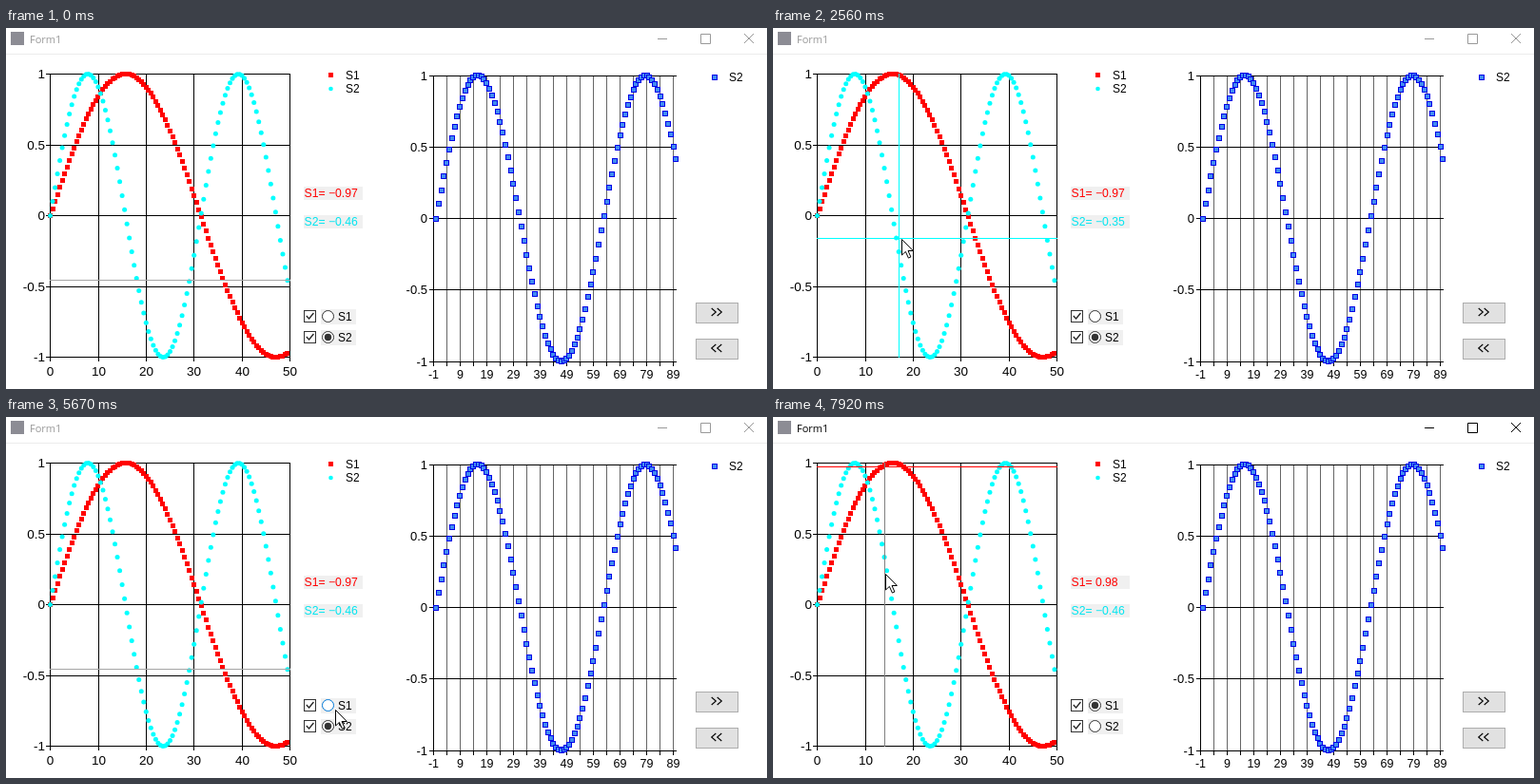
Recreate the animation shown at these times as an HTML page. Size 800x380 px, loop 8 s.

```html
<!DOCTYPE html>
<html lang="en">
<head>
<meta charset="utf-8">
<title>Form1</title>
<style>
  html, body { margin: 0; width: 100%; height: 100%; overflow: hidden; background: #fff; }
  svg { display: block; width: 800px; height: 380px; }
  text { font-family: "Liberation Sans", Arial, sans-serif; }
  .title { font: 11px "Open Sans", "Noto Sans", sans-serif; }
  .crisp { shape-rendering: crispEdges; }
</style>
</head>
<body>
<svg id="stage" viewBox="0 0 800 380"></svg>
<script>
const stage = document.getElementById('stage');
const LOOP = 8000, CLICK = 6020, RESUME = 6190;

function add(tag, attrs, text) {
  const node = document.createElementNS('http://www.w3.org/2000/svg', tag);
  for (const key in attrs) node.setAttribute(key, attrs[key]);
  if (text !== undefined) node.textContent = text;
  stage.append(node);
  return node;
}
const rect = (x, y, width, height, fill, more) =>
  add('rect', { x, y, width, height, fill, class: 'crisp', ...more });
const frame = (x, y, w, h, stroke, fill = 'none') =>
  rect(x + .5, y + .5, w - 1, h - 1, fill, { stroke });
const hline = (x1, x2, y, color = '#000') => rect(x1, y, x2 - x1 + 1, 1, color);
const vline = (x, y1, y2, color = '#000') => rect(x, y1, 1, y2 - y1 + 1, color);
const stroke = (d, color, width = 1) =>
  add('path', { d, fill: 'none', stroke: color, 'stroke-width': width });
const label = (x, y, text, size, fill = '#000', anchor = 'start') =>
  add('text', { x, y, 'font-size': size, fill, 'text-anchor': anchor }, text);

// Title bar
rect(0, 27, 800, 1, '#ececec');
rect(5, 4, 14, 14, '#8c8c94');
const title = add('text', { x: 25, y: 16, class: 'title' }, 'Form1');
const minimize = stroke('M685 11.5H695', '#999');
const maximize = stroke('M730.5 6.5H740.5V16.5H730.5Z', '#999');
const close = stroke('M776 6L786 16M786 6L776 16', '#999');

// Left chart
const LEFT = { x: 46, y: 197, sx: 5.04, sy: 149 };
const s1 = x => Math.sin(x / 10), s2 = x => Math.sin(x / 5);
for (let i = 0; i <= 5; i++) {
  const x = Math.round(LEFT.x + .1 + i * 50.4);
  vline(x, 48, 350);
  label(x + .5, 366, i * 10, 13.5, '#000', 'middle');
}
for (let i = -2; i <= 2; i++) {
  const y = Math.round(LEFT.y - i * 74.5);
  hline(42, 298, y);
  label(41, y + 4.5, i / 2, 13.5, '#000', 'end');
}
for (let i = 0; i < 100; i++) {
  const v = i / 2, x = LEFT.x + .5 + v * LEFT.sx;
  rect(Math.round(x - 2.5), Math.round(LEFT.y - s1(v) * LEFT.sy - 2), 5, 5, '#f00');
}
for (let i = 0; i < 100; i++) {
  const v = i / 2;
  add('circle', { cx: LEFT.x + .5 + v * LEFT.sx, cy: LEFT.y + .5 - s2(v) * LEFT.sy, r: 2.5, fill: '#0ff' });
}
rect(339, 47, 5, 5, '#f00');
add('circle', { cx: 341.5, cy: 64, r: 2.3, fill: '#0ff' });
label(357, 54, 'S1', 12);
label(357, 68, 'S2', 12);

// Right chart
for (let k = 0; k <= 18; k++) {
  const x = 449 + 14 * k;
  vline(x, 50, 351, k ? '#666' : '#000');
  vline(x, 351, 355);
  if (k % 2 === 0) label(x + .5, 369, k * 5 - 1, 12.5, '#000', 'middle');
}
for (let i = -2; i <= 2; i++) {
  const y = Math.round(200 - i * 75.25);
  hline(445, 704, y);
  label(443, y + 4.5, i / 2, 13, '#000', 'end');
}
const bluePoint = (x, y) => frame(Math.round(x - 3), Math.round(y - 3), 6, 6, '#0000e8', '#418cf0');
for (let x = 0; x <= 90; x++) bluePoint(452 + x * 2.805, 200.5 - s1(x) * 150.5);
bluePoint(744.5, 51.5);
label(760, 56, 'S2', 12);

// Controls
function readout(y, color) {
  rect(313, y, 62, 14, '#f0f0f0');
  return label(313.5, y + 11.3, '', 12.2, color);
}
const read1 = readout(167, '#f00'), read2 = readout(197, '#00e5f0');

function optionRow(y, name) {
  frame(313, y - 7, 13, 13, '#333', '#fff');
  stroke(`M315.8 ${y - .5}L318.6 ${y + 2.5}L323.4 ${y - 3.5}`, '#222', 1.3);
  rect(331, y - 8, 37, 16, '#f0f0f0');
  const ring = add('circle', { cx: 338.5, cy: y, r: 6, fill: '#fff', stroke: '#333' });
  const dot = add('circle', { cx: 338.5, cy: y, r: 3.7, fill: '#333' });
  label(349, y + 4.5, name, 12);
  return { y, ring, dot };
}
const option1 = optionRow(303.5, 'S1'), option2 = optionRow(325.5, 'S2');

function button(y, dir) {
  frame(725, y, 45, 22, '#adadad', '#e1e1e1');
  for (const x of [744, 750])
    stroke(`M${x - 2.3 * dir} ${y + 6}l${4.6 * dir} 4l${-4.6 * dir} 4`, '#000', 1.1);
}
button(289, 1);
button(327, -1);

// Moving parts
const crossH = hline(46, 298, 0), crossV = vline(0, 48, 346);
const pointer = add('path', {
  d: 'M0 0V16.5L3.9 12.9L6.9 19.6L9.4 18.5L6.5 12H11.8Z',
  fill: '#fff', stroke: '#000', 'stroke-width': 1
});

// start, end, steps, target x, target y, ease-out power, grey vertical line
const moves = [
  [330, 1360, 7, 229, 219, 2],
  [1530, 2560, 7, 135, 222, 2],
  [2730, 3770, 7, 68, 186, 1],
  [3930, 3930, 1, 67, 187, 1],
  [4620, 4620, 1, 86, 185, 1, true],
  [4790, 5490, 5, 345, 270, 1.3],
  [5670, 5670, 1, 346, 308, 1],
  [CLICK, CLICK, 1, 346, 308, 1],
  [RESUME, 7050, 6, 176, 193, 1.5],
  [7240, 7240, 1, 175, 192, 1],
  [7410, 7920, 4, 118, 165, 2.1, true]
];
const steps = [{ t: 0, x: 620, y: 381 }];
for (const [start, end, n, x, y, power, grey] of moves) {
  const from = steps[steps.length - 1];
  for (let i = 1; i <= n; i++) {
    const rest = (1 - i / n) ** power;
    steps.push({
      t: n > 1 ? start + (end - start) * (i - 1) / (n - 1) : start,
      x: x + (from.x - x) * rest,
      y: y + (from.y - y) * rest,
      grey
    });
  }
}
for (const s of steps)
  s.pos = Math.max(1, Math.min(50, Math.floor((s.x - LEFT.x) / LEFT.sx)));

const show = (node, on) => node.setAttribute('visibility', on ? 'visible' : 'hidden');
const format = v => v.toFixed(2).replace('-', '−');

function render(t) {
  let i = steps.length - 1;
  while (i && steps[i].t > t + .5) i--;
  const now = steps[i], before = steps[Math.max(0, i - 1)];
  const clicked = t >= CLICK, series = t >= RESUME ? s1 : s2;
  const color = clicked ? '#f00' : '#0ff', parked = now.pos >= 50;

  // The readout trails the crosshair by one step.
  const shown = before.pos - .5;
  read1.textContent = 'S1= ' + format(s1(clicked ? shown : 49.5));
  read2.textContent = 'S2= ' + format(s2(clicked ? 49.5 : shown));

  crossH.setAttribute('y', Math.round(LEFT.y - series(now.pos - .5) * LEFT.sy));
  crossH.setAttribute('fill', parked ? '#a6a6a6' : color);
  crossV.setAttribute('x', Math.round(LEFT.x + .1 + now.pos * LEFT.sx));
  crossV.setAttribute('fill', now.grey ? (clicked ? '#808080' : '#a6a6a6') : color);
  show(crossV, !parked);

  show(pointer, i > 0);
  pointer.setAttribute('transform', `translate(${Math.round(now.x) + .5} ${Math.round(now.y) + .5})`);

  for (const o of [option1, option2]) {
    const hover = now.x > 331 && now.x < 368 && Math.abs(now.y - o.y) < 8;
    const ink = hover ? '#0078d7' : '#333';
    o.ring.setAttribute('stroke', ink);
    o.dot.setAttribute('fill', ink);
    show(o.dot, (o === option1) === clicked);
  }

  const chrome = clicked ? '#000' : '#999';
  title.setAttribute('fill', chrome);
  for (const glyph of [minimize, maximize, close]) glyph.setAttribute('stroke', chrome);
}

function tick() {
  render(performance.now() % LOOP);
  requestAnimationFrame(tick);
}
tick();
</script>
</body>
</html>
```
